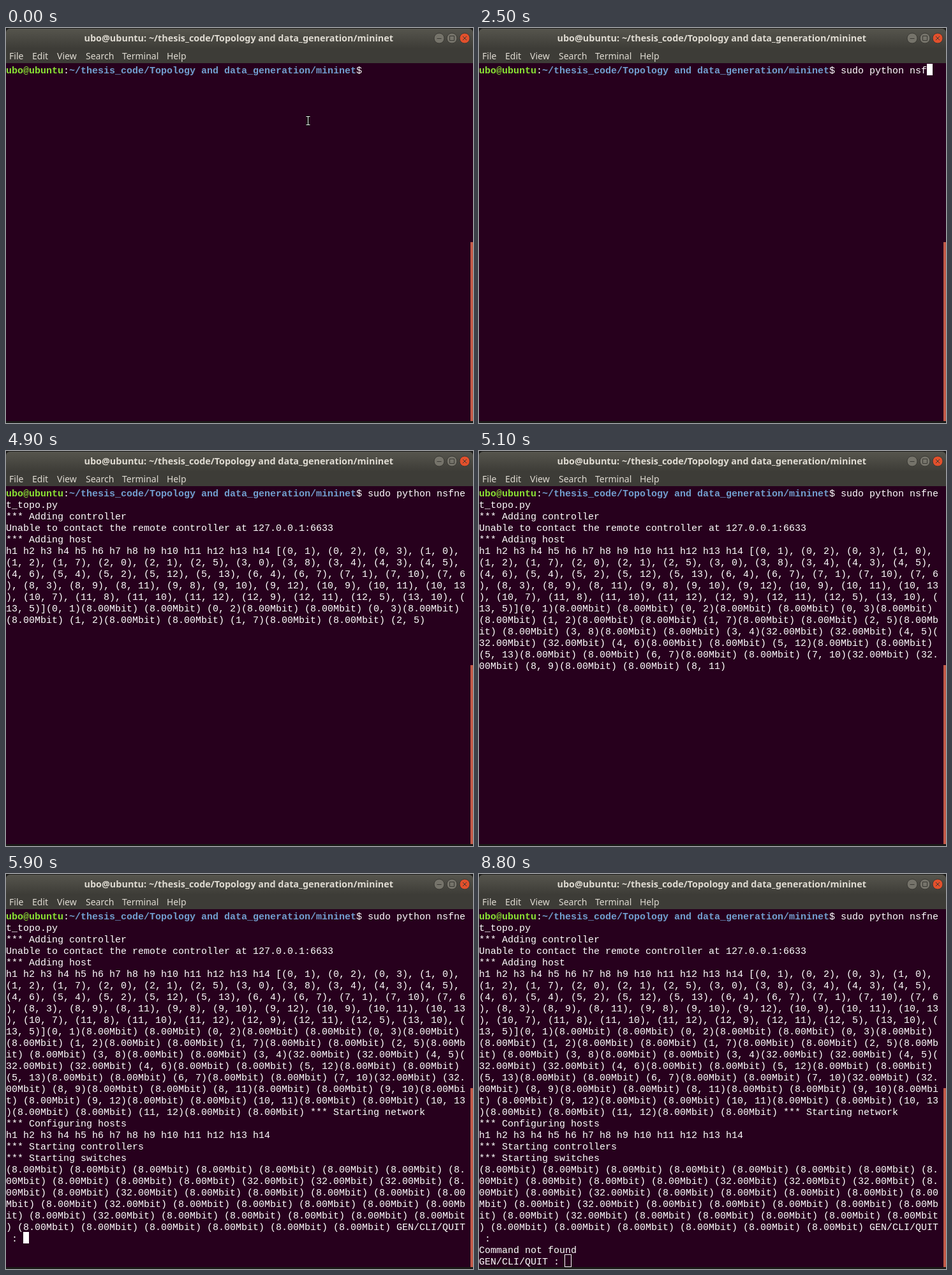
An HTML page with a canvas for the animation above (8900 ms loop, 732x618 px).

```html
<!DOCTYPE html>
<html lang="en">
<head>
<meta charset="utf-8">
<title>Terminal</title>
<style>
  html, body { margin: 0; width: 100%; height: 100%; overflow: hidden; background: #27001d; }
  canvas { display: block; }
</style>
</head>
<body>
<canvas id="stage" width="732" height="618"></canvas>
<script>
const ctx = document.getElementById('stage').getContext('2d');
const LOOP = 8900, COLS = 80, CELL_W = 9, CELL_H = 18, TOP = 56;
const MONO = '15px "Liberation Mono", monospace';
const SANS = '"Noto Sans", "Open Sans", sans-serif';

// Terminal session
const user = 'ubo@ubuntu';
const path = '~/thesis_code/Topology and data_generation/mininet';
const neighbours = [[1, 2, 3], [0, 2, 7], [0, 1, 5], [0, 8, 4], [3, 5, 6], [4, 2, 12, 13], [4, 7],
  [1, 10, 6], [3, 9, 11], [8, 10, 12], [9, 11, 13, 7], [8, 10, 12], [9, 11, 5], [10, 5]];
const edges = neighbours.flatMap((list, a) => list.map(b => [a, b]));
const pair = ([a, b]) => `(${a}, ${b})`;
const rate = fast => fast ? '(32.00Mbit) ' : '(8.00Mbit) ';
const fastLinks = ['(3, 4)', '(4, 5)', '(7, 10)'];
const fastPorts = [12, 13, 14, 17, 24, 31];

const hosts = neighbours.map((_, i) => `h${i + 1} `).join('');
const links = edges.filter(([a, b]) => a < b).map(pair)
  .map(name => name + rate(fastLinks.includes(name)).repeat(2)).join('');
const ports = edges.map((_, i) => rate(fastPorts.includes(i + 1)));
const ask = 'GEN/CLI/QUIT : ';

const setup = `${user}:${path}$ sudo python nsfnet_topo.py \n` +
  '*** Adding controller\nUnable to contact the remote controller at 127.0.0.1:6633\n' +
  `*** Adding host\n${hosts}[${edges.map(pair).join(', ')}]${links}*** Starting network\n` +
  `*** Configuring hosts\n${hosts}\n*** Starting controllers\n*** Starting switches\n`;
const session = setup + ports.join('') + ask + '\nCommand not found\n' + ask;

// Each step: start time, last visible text (or number of ports listed), cursor style
const HIDDEN = 0, BLOCK = 1, HOLLOW = 2;
const steps = [
  [0, '$ ', HIDDEN],
  [400, '$ ', BLOCK],
  [500, '$ s', BLOCK],
  [800, '$ sud', BLOCK],
  [1100, '$ sudo', BLOCK],
  [1300, '$ sudo py', BLOCK],
  [1600, '$ sudo pyth', BLOCK],
  [1900, '$ sudo python', BLOCK],
  [2000, '$ sudo python ', BLOCK],
  [2300, 'python ns', BLOCK],
  [2500, 'python nsf', BLOCK],
  [2900, 'topo.py ', BLOCK],
  [3500, 'topo.py ', HIDDEN],
  [3700, 'Adding controller\n', HIDDEN],
  [3800, ':6633\n', HIDDEN],
  [3900, 'Adding host\n', HIDDEN],
  [4000, 'h9 ', BLOCK],
  [4100, 'h14 ', BLOCK],
  [4200, '](0, 1)', HIDDEN],
  [4900, ') (2, 5)', HIDDEN],
  [5000, ') (5, 12)', HIDDEN],
  [5100, ') (8, 11)', HIDDEN],
  [5200, ') (11, 12)', HIDDEN],
  [5300, 'Starting switches\n', HIDDEN],
  [5400, 27, HIDDEN],
  [5500, 33, HIDDEN],
  [5600, 39, HIDDEN],
  [5700, ask, HIDDEN],
  [5900, ask, BLOCK],
  [7000, ask + '\n', BLOCK],
  [7100, 'not found\n', BLOCK],
  [7200, 'not found\n' + ask, BLOCK],
  [7800, 'not found\n' + ask, HIDDEN],
  [8400, 'not found\n' + ask, BLOCK],
  [8800, 'not found\n' + ask, HOLLOW]
].map(([time, end, cursor]) => ({
  time, cursor,
  length: typeof end === 'number'
    ? setup.length + ports.slice(0, end).join('').length
    : session.indexOf(end) + end.length
}));

function rect(x, y, w, h, color) {
  ctx.fillStyle = color;
  ctx.fillRect(x, y, w, h);
}

function label(text, x, y, font, align = 'left') {
  ctx.font = font;
  ctx.textAlign = align;
  ctx.fillStyle = '#dfdbd2';
  ctx.fillText(text, x, y);
}

function button(x, fill, glyph) {
  ctx.beginPath();
  ctx.arc(x, 16, 8, 0, 7);
  ctx.fillStyle = fill;
  ctx.fill();
  ctx.lineWidth = 1;
  ctx.strokeStyle = '#3a3934';
  ctx.stroke();
  ctx.stroke(new Path2D(glyph));
}

function drawWindow() {
  rect(0, 0, 732, 618, '#27001d');
  rect(0, 0, 732, 10, '#1b1a18');
  const bar = ctx.createLinearGradient(0, 0, 0, 32);
  bar.addColorStop(0, '#57564e');
  bar.addColorStop(1, '#3d3c37');
  ctx.fillStyle = bar;
  ctx.beginPath();
  ctx.roundRect(0, 1, 732, 54, [6, 6, 0, 0]);
  ctx.fill();
  label(`${user}: ${path}`, 607, 21, `bold 14.4px ${SANS}`, 'right');
  [['File', 5], ['Edit', 41], ['View', 80], ['Search', 125], ['Terminal', 182], ['Help', 252]]
    .forEach(([name, x]) => label(name, x, 49, `14px ${SANS}`));
  button(679, '#75736a', 'M675.5 16.5h7');
  button(699, '#75736a', 'M695.5 12.5h7v7h-7z');
  button(719, '#e2502c', 'M716 13l6 6m0-6l-6 6');
  rect(728, 335, 4, 280, '#c25a48');
  rect(0, 615, 732, 3, '#1b1a18');
}

function drawSession({ length, cursor }) {
  const pathStart = user.length + 1, pathEnd = pathStart + path.length;
  let col = 0, row = 0;
  ctx.textAlign = 'left';
  for (let i = 0; i < length; i++) {
    const ch = session[i];
    if (ch === '\n') { col = 0; row++; continue; }
    if (col === COLS) { col = 0; row++; }
    const isUser = i < user.length, isPath = i >= pathStart && i < pathEnd;
    ctx.font = (isUser || isPath ? 'bold ' : '') + MONO;
    ctx.fillStyle = isUser ? '#8ae234' : isPath ? '#729fcf' : '#fff';
    ctx.fillText(ch, col++ * CELL_W, TOP + row * CELL_H + 15);
  }
  const x = col * CELL_W, y = TOP + row * CELL_H;
  if (cursor === BLOCK) rect(x, y, CELL_W, CELL_H, '#fff');
  if (cursor === HOLLOW) {
    ctx.strokeStyle = '#fff';
    ctx.lineWidth = 1;
    ctx.strokeRect(x - .5, y - .5, CELL_W + 1, CELL_H + 1);
  }
}

function drawPointer(x, y) {
  ctx.lineWidth = 3;
  ctx.strokeStyle = '#000';
  const beam = new Path2D(`M${x - 2.5} ${y - 6.5}h6m-6 13h6m-3-13v13`);
  ctx.stroke(beam);
  ctx.lineWidth = 1;
  ctx.strokeStyle = '#fff';
  ctx.stroke(beam);
}

function frame(now) {
  const t = now % LOOP;
  drawWindow();
  drawSession(steps.findLast(step => step.time <= t));
  if (t < 400) drawPointer(473, 145);
  else if (t >= 7900 && t < 8000) drawPointer(490, 110);
  else if (t >= 8000 && t < 8100) drawPointer(517, 41);
  requestAnimationFrame(() => frame(performance.now() - start));
}

const start = performance.now();
frame(0);
</script>
</body>
</html>
```
